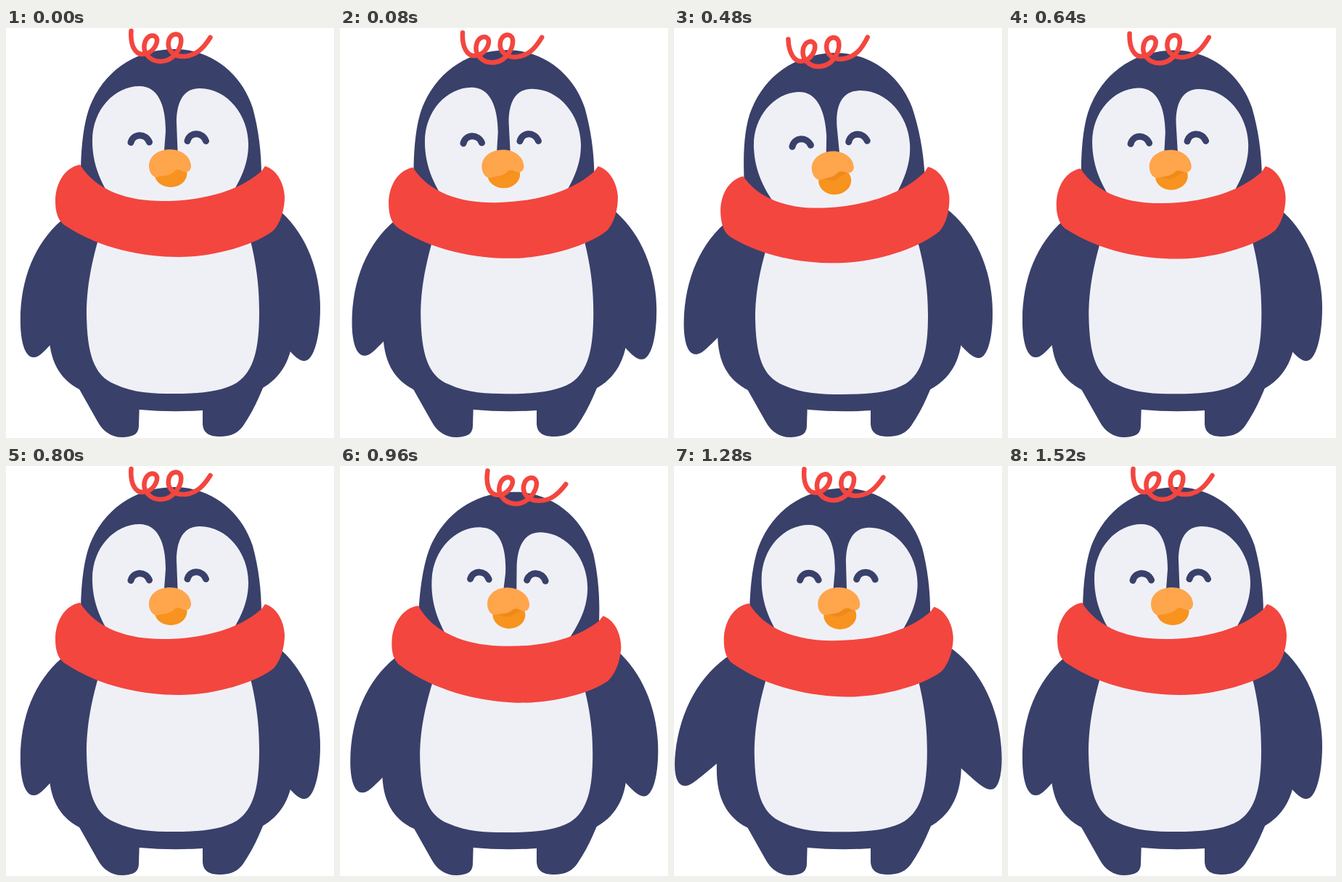
An HTML page for the animation above (1600 ms loop, 452 px wide and 564 px high).

```html
<!DOCTYPE html>
<html lang="en">
<head>
<meta charset="utf-8">
<title>Happy penguin</title>
<style>
  html, body { margin: 0; width: 100%; height: 100%; overflow: hidden; background: #fff; }
  svg { display: block; width: 100vw; height: 100vh; }
  .navy { fill: #39406a; }
  .white { fill: #eff0f6; }
  .red { fill: #f3463f; }
  .line { fill: none; stroke-linecap: round; stroke-linejoin: round; }
</style>
</head>
<body>
<svg viewBox="0 0 452 564">
  <path class="navy" d="M96 488L126 541C134 556 147 564 162 563C177 562 183 558 183 546L184 515ZM271 515L271 545C272 558 281 562 295 562C310 562 320 557 327 547C340 528 348 510 357 488Z"/>
  <path id="armL" class="navy" d="M120 235L76 265C38 298 18 350 20 410C21 435 27 453 38 453C46 453 52 445 60 437L88 406L140 320Z"/>
  <path id="armR" class="navy" d="M335 225L379 253C414 284 433 335 433 385C433 425 424 458 411 458C404 458 397 451 390 443L365 413L320 320Z"/>
  <g id="torso">
    <path class="navy" d="M95 240C70 300 59 360 59 415C59 458 74 483 101 497L184 525Q228 529 271 526L352 496C378 482 395 456 396 415C397 360 385 300 358 240Z"/>
    <path class="white" d="M140 250C116 320 111 360 111 395C112 446 120 478 150 490C175 502 203 503 230 503C265 503 296 501 318 488C342 472 349 440 349 390C349 350 344 310 325 250Z"/>
  </g>
  <g id="upper">
    <g id="head">
      <path class="navy" d="M103 205C103 165 107 124 119 100C141 54 183 29 234 29C284 30 325 63 340 110C348 140 352 170 352 205L345 245L112 245Z"/>
      <path class="white" d="M165 260C130 220 119 187 119 155C119 112 150 80 184 80C209 80 220 105 220 142L217 182H237L235 130C235 101 245 83 267 83C305 83 334 120 334 160C334 190 322 215 290 260Z"/>
      <path id="curl" class="line" stroke="#f3463f" stroke-width="6.500" d="M172.500 4C171 24 178 36 188 36C202 36 209 22 208 15C206 8 196 9 192 18C186 34 199 46 213 46C232 46 243 25 241 14C239 6 229 7 225 15C220 30 231 40 246 39C262 38 272 28 281.500 13"/>
      <g id="face">
        <path class="line" stroke="#39406a" stroke-width="9" d="M172 157.500C175.500 144.500 192.500 144.500 197.500 157M250 155.500C253.500 142.500 270.500 142.500 275.500 155.500"/>
        <ellipse id="jaw" cx="227" cy="200" rx="22.500" ry="19" fill="#f7931e"/>
        <path id="shade" fill="#ee891b" d="M208 203C226 203 228 196 238 196L247 198C237 199 232 209 222 207Z"/>
        <path fill="#ffa54c" d="M197 190C197 176 210 167 226 167C243 167 255 178 255 190C255 197 249 200 243 197C236 193 233 196 230 199C224 204 214 203 210 205C202 207 197 198 197 190Z"/>
      </g>
    </g>
    <path class="red" d="M102 188C80 192 68 215 68 238C68 258 74 267 82 272C130 304 190 315 238 315C290 315 345 297 368 279C378 269 384 250 384 232C383 212 372 194 357 190L352 197C320 225 270 238 215 238C170 238 125 225 102 188Z"/>
  </g>
</svg>
<script>
  const LOOP = 1600, STEP = 80;

  const clamp = u => Math.min(1, Math.max(0, u));
  const ease = u => (1 - Math.cos(Math.PI * clamp(u))) / 2;
  // Rises from 0 to 1 at the peak, then settles back to 0
  const bump = (t, from, peak, to) =>
    t < peak ? ease((t - from) / (peak - from)) : ease((to - t) / (to - peak));

  const part = id => document.getElementById(id);
  const place = (id, transform) => part(id).setAttribute("transform", transform);

  function pose(t) {
    // One nod to each side, with a flap and a laugh in each half
    const left = bump(t, 0, 300, 800), right = bump(t, 800, 1000, 1400);
    const flap = bump(t, 0, 290, 600) + bump(t, 800, 1240, 1520);
    const laugh = bump(t, 0, 400, 800) + bump(t, 800, 1120, 1520);
    const lean = 3 * right - 4.7 * left;
    const drop = 12 * left + 11 * right;

    place("armL", `translate(0 ${-4 * flap}) rotate(${8.8 * flap} 90 280)`);
    place("armR", `translate(0 ${-5 * flap}) rotate(${-8.8 * flap} 367 270)`);
    place("torso", `translate(${-0.3 * lean} 527) scale(1 ${1 - 0.0045 * drop}) translate(0 -527)`);
    place("upper", `translate(${lean} ${drop}) rotate(${lean} 226 250)`);
    place("head", `translate(0 ${-0.38 * drop})`);
    place("curl", `translate(${5 * left + 17 * right} 0) rotate(${0.85 * lean} 227 25)`);
    place("face", `translate(0 ${-4 * left - 6.5 * right})`);
    place("jaw", `translate(${laugh} ${8.5 * laugh})`);
    part("shade").setAttribute("opacity", clamp(2 * laugh));
  }

  let start;
  function tick(now) {
    if (start === undefined) start = now;
    const t = Math.max(0, now - start) % LOOP;
    pose(Math.floor(t / STEP) * STEP);
    requestAnimationFrame(tick);
  }
  pose(0);
  requestAnimationFrame(tick);
</script>
</body>
</html>
```
